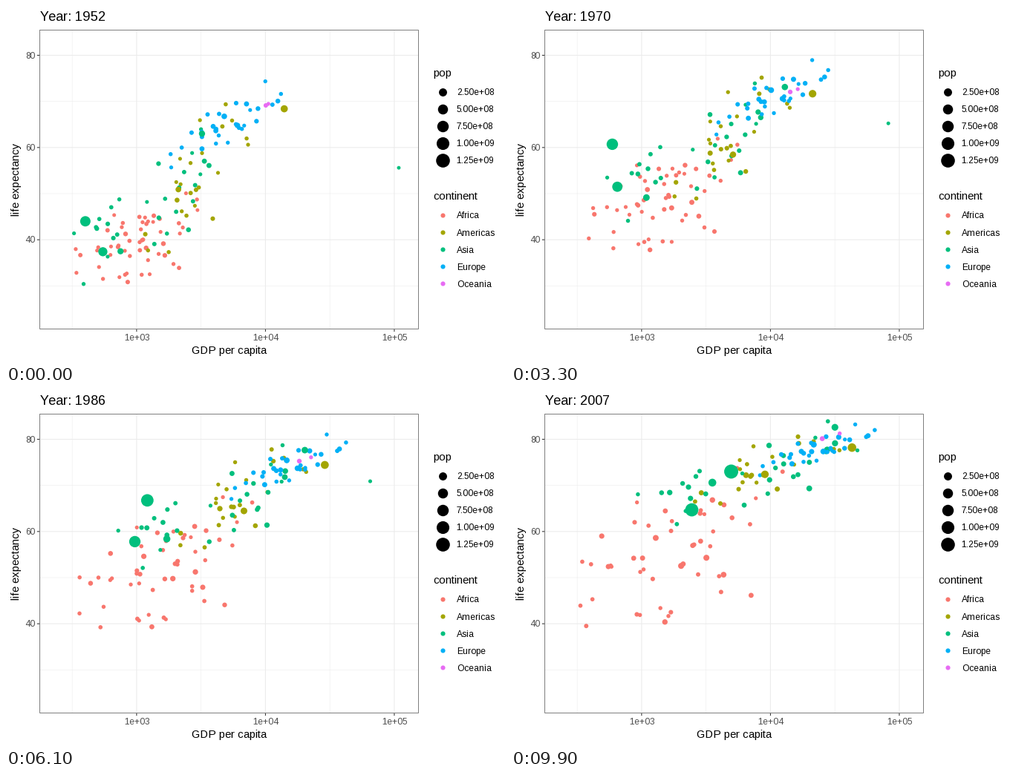
Recreate the animation shown at these times as a matplotlib script. Size 672x480 px, loop 10 s.

```python
import numpy as np
import matplotlib.pyplot as plt
from matplotlib.animation import FuncAnimation

W, H, DPI = 672, 480, 100
PX = 72 / DPI
FRAMES, STEP = 100, 9              # nine frames per five-year knot
S = np.linspace(0, 1, 12)          # knots, 1952 to 2007
plt.rcParams["font.family"] = "Liberation Sans"
plt.rcParams["text.hinting_factor"] = 1   # whole-pixel letter spacing

COLORS = {"Africa": "#F8766D", "Americas": "#A3A500", "Asia": "#00BF7D",
          "Europe": "#00B0F6", "Oceania": "#E76BF3"}

# Standout dots: continent, population in millions (first, last), then GDP
# per capita and life expectancy, each as (first, last, easing power).
STANDOUTS = [
    ("Asia", (556, 1319), (400, 4959, 1.7), (44, 73, .5)),
    ("Asia", (372, 1110), (547, 2452, 2), (37.4, 64.7, .6)),
    ("Americas", (157, 301), (13990, 42952, .9), (68.4, 78.2, 1)),
    ("Asia", (82, 223), (750, 3541, 1.3), (37.5, 70.6, .95)),
    ("Americas", (57, 190), (2109, 9066, .45), (50.9, 72.4, .95)),
    ("Asia", (86, 127), (3217, 31656, .45), (63, 82.6, .6)),
    ("Asia", (.2, 2.5), (108382, 47307, 1), (55.6, 77.6, .75)),
]

# Clouds: count, eased GDP and life, their spreads (first, last),
# correlation, median population, population growth.
CLOUDS = {
    "Africa": (52, (1000, 1660, .4), (39.2, 55, .5),
               (.26, .42), (4.8, 8.6), .42, 3, 3.7),
    "Americas": (23, (2950, 8500, .7), (53.4, 73.6, .75),
                 (.22, .29), (8.8, 4), .65, 3.5, 2.6),
    "Asia": (28, (1260, 6760, .75), (47, 72, .7),
             (.33, .46), (8, 5.4), .72, 6, 2.9),
    "Europe": (30, (5000, 22900, .65), (65, 77.8, .7),
               (.24, .24), (4.6, 2.7), .84, 8, 1.3),
    "Oceania": (2, (10300, 29500, .9), (69.3, 80.7, 1.2),
                (.01, .068), (.15, .5), .99, 4, 2.2),
}


def ease(first, last, power=1):
    return first + (last - first) * S ** power


def ease_log(first, last, power=1):
    return ease(np.log10(first), np.log10(last), power)


def px_x(log_gdp):
    return 175.9 + 173.5 * (log_gdp - 3)


def px_y(life):
    return 190.8 - 6.2175 * (life - 60)


def dot_size(millions):
    """Population to point size in mm, scaled by area."""
    return 1 + 5 * np.sqrt(np.clip((millions - .06) / 1318.6, 0, 1))


def area(mm):
    """Marker area in square points, outline included."""
    return ((2.845 * mm + 1.89) * PX) ** 2


def scores(rng, n):
    z = rng.normal(size=n)
    return np.clip((z - z.mean()) / z.std(), -1.8, 1.8)[:, None]


def cloud(rng, n, gdp, life, sx, sy, corr, pop, growth):
    wealth, later, health = (scores(rng, n) for _ in range(3))
    turn = .5 * S * (1 - corr)
    u = wealth * np.cos(turn) + later * np.sin(turn)
    wobble = rng.normal(0, .1 * (1 - corr), (n, len(S)))
    x = ease_log(*gdp) + ease(*sx) * (u + wobble)
    y = ease(*life) + ease(*sy) * (corr * u + np.sqrt(1 - corr ** 2) * health)
    return x, y, dot_size(pop * np.exp(1.05 * scores(rng, n)) * growth ** S)


def build():
    rng = np.random.default_rng(1952)
    rows, colors = [], []
    for cont, spec in CLOUDS.items():
        rows += zip(*cloud(rng, *spec))
        colors += [COLORS[cont]] * spec[0]
    for cont, pop, gdp, life in STANDOUTS:
        rows.append((ease_log(*gdp), ease(*life), dot_size(10 ** ease_log(*pop))))
        colors.append(COLORS[cont])
    return np.array(rows), colors


fig = plt.figure(figsize=(W / DPI, H / DPI), dpi=DPI, facecolor="white")
ax = fig.add_axes([0, 0, 1, 1])
ax.set(xlim=(0, W), ylim=(H, 0))
ax.axis("off")

L, R, T, B = 45.5, 555.5, 32.5, 435.5
GRID, TICK, LABEL, BORDER = "#EBEBEB", "#333333", "#4D4D4D", "#7F7F7F"
SMALL, MEDIUM, LARGE = 11.73, 14.67, 17.6


def line(xs, ys, color, width=1.07, z=1):
    ax.plot(xs, ys, color=color, lw=width * PX, zorder=z, snap=False,
            solid_capstyle="butt", solid_joinstyle="miter")


def text(x, y, s, size, color="black", **kw):
    return ax.text(x, y, s, fontsize=size * PX, color=color, **kw)


def legend(top, title, keys):
    text(575.5, top, title, MEDIUM)
    for i, (label, mm, color) in enumerate(keys):
        y = top + 20.9 + 23.04 * i
        ax.scatter(588, y, s=area(mm), c=color, linewidths=0)
        text(606.7, y + 4.2, label, SMALL)


for v in (2.5, 3.5, 4.5):
    line([px_x(v)] * 2, [T, B], GRID, .53)
for v in (30, 50, 70):
    line([L, R], [px_y(v)] * 2, GRID, .53)
for v in (3, 4, 5):
    x = px_x(v)
    line([x, x], [T, B], GRID)
    line([x, x], [B, B + 3.67], TICK, z=4)
    text(x, 451, f"1e+0{v}", SMALL, LABEL, ha="center")
for v in (40, 60, 80):
    y = px_y(v)
    line([L, R], [y, y], GRID)
    line([L - 3.67, L], [y, y], TICK, z=4)
    text(39, y + 4.2, str(v), SMALL, LABEL, ha="right")
line([L, R, R, L, L], [T, T, B, B, T], BORDER, 1, z=4)

text(300.5, 469, "GDP per capita", MEDIUM, ha="center")
text(14, 233.5, "life expectancy", MEDIUM, ha="center", va="center", rotation=90)
title = text(45.5, 20, "", LARGE)

legend(94.6, "pop", [(f"{m * 1e6:.2e}", dot_size(m), "black")
                     for m in range(250, 1251, 250)])
legend(261.4, "continent", [(name, 1.5, c) for name, c in COLORS.items()])

data, dot_colors = build()
points = ax.scatter(*data[:, :2, 0].T, c=dot_colors, linewidths=0, zorder=3)


def draw(frame):
    i = min(frame // STEP, len(S) - 2)
    f = frame / STEP - i
    x, y, mm = (data[:, :, i] * (1 - f) + data[:, :, i + 1] * f).T
    points.set_offsets(np.column_stack([px_x(x), px_y(y)]))
    points.set_sizes(area(mm))
    title.set_text(f"Year: {round(1952 + 5 * frame / STEP)}")
    return points, title


anim = FuncAnimation(fig, draw, frames=FRAMES, interval=100, repeat=True,
                     repeat_delay=0, blit=False)
plt.show()
```
